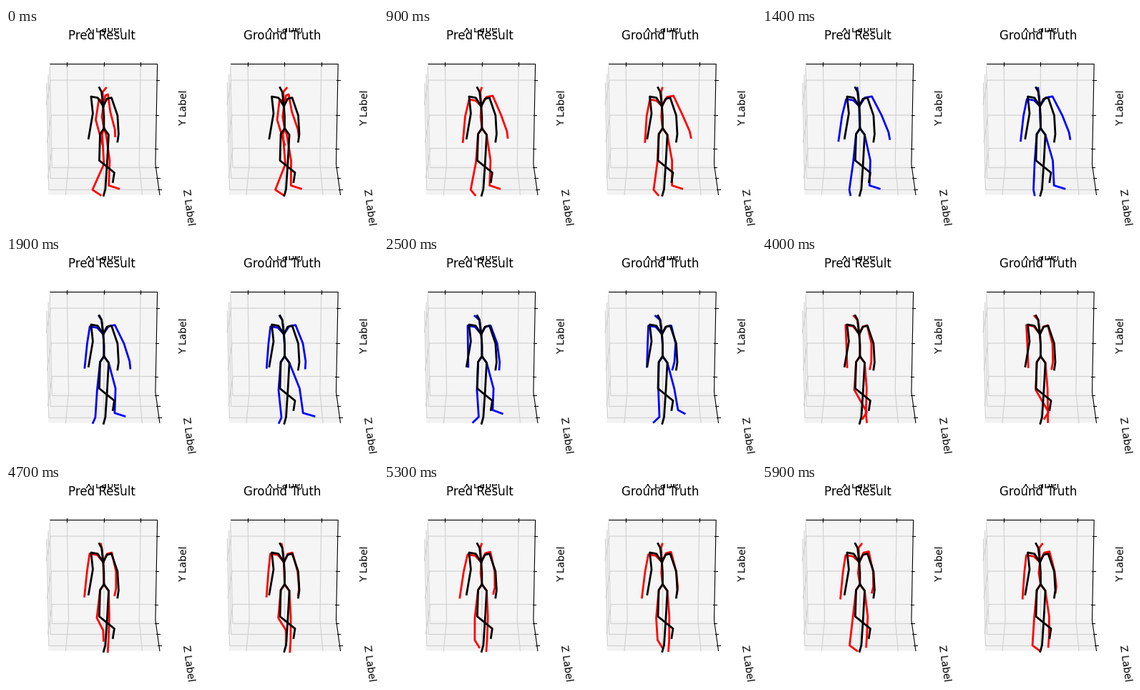
Write a matplotlib script that moves like this. It is 520 by 280 pixels and loops after 6 s.

```python
import numpy as np
import matplotlib.pyplot as plt
from matplotlib.animation import FuncAnimation

W, H, DPI = 520, 280, 100
FRAMES, INTERVAL = 60, 100
ROOT, THORAX = (137, 140), (136, 109)

fig = plt.figure(figsize=(W / DPI, H / DPI), dpi=DPI, facecolor="white")
ax = fig.add_axes([0, 0, 1, 1])
ax.set_xlim(-0.5, W - 0.5)
ax.set_ylim(H - 0.5, -0.5)
ax.axis("off")


def lerp(a, b, f):
    return tuple(p + (q - p) * f for p, q in zip(a, b))


def path(dx, *points, **style):
    x, y = np.array(points, float).T
    return ax.plot(x + dx, y, **style)[0]


def draw_box(dx):
    """Perspective box: back wall, floor and left wall with grid and ticks."""
    top_l, top_r = (62, 50), (211.7, 50)
    back_l, back_r = (65, 190), (209, 190)
    front_l, front_r = (59, 233), (215, 233)
    front_top = (56, 82)
    for corners, shade in (
        ((top_l, back_l, front_l, front_top), 0.975),
        ((back_l, back_r, front_r, front_l), 0.95),
        ((top_l, top_r, back_r, back_l), 0.9625),
    ):
        x, y = np.array(corners).T
        ax.fill(x + dx, y, color=str(shade), lw=0)

    grid = dict(color="#d0d0d0", lw=0.8, zorder=1.5)
    axis = dict(color="black", lw=0.8, zorder=1.8)
    for f in (0.157, 0.5, 0.843):
        x, y = lerp(top_l, top_r, f)
        path(dx, (x, y), lerp(back_l, back_r, f), lerp(front_l, front_r, f), **grid)
        path(dx, (x, y - 3), (x, y + 2), **axis)
    for f in (0.161, 0.511, 0.843):
        x, y = lerp(top_r, back_r, f)
        path(dx, lerp(front_top, front_l, f), lerp(top_l, back_l, f), (x, y), **grid)
        path(dx, (x - 1.5, y), (x + 3, y), **axis)
    for f in (0.116, 0.465, 0.837):
        x, y = lerp(back_r, front_r, f)
        path(dx, lerp(top_l, front_top, f), lerp(back_l, front_l, f), (x, y), **grid)
        path(dx, (x - 1.5, y), (x + 3, y), **axis)
    path(dx, top_l, top_r, back_r, front_r, **axis)


def draw_labels(dx, title):
    centre = dict(ha="center", va="baseline", rotation_mode="anchor")
    ax.text(134 + dx, 16, title, size=12, **centre)
    ax.text(137 + dx, 6, "X Label", size=10, **centre)
    ax.text(253 + dx, 111, "Y Label", size=10, rotation=89, **centre)
    ax.text(251 + dx, 251.3, "Z Label", size=10, rotation=-82, **centre)


def wave(t, peak, period):
    return np.cos(2 * np.pi * (t - peak) / period)


def bump(t, peak, width):
    return np.exp(-((t - peak) / width) ** 2)


def smoothstep(u):
    u = np.clip(u, 0, 1)
    return u * u * (3 - 2 * u)


def walk(t, drift):
    """Head, arms (shoulder, elbow, hand) and legs (knee, ankle, toe) at time t.

    drift is 0 for the predicted walk and 1 for the true one.
    """
    start = np.exp(-t / 5)             # body still turned sideways
    turn = wave(t, -2, 66)
    swing = wave(t, 33, 40)            # left arm
    reach = bump(t, 14.5, 11)          # right arm
    stride = bump(t, 37, 13)           # left leg crosses over
    lift = bump(t, 47, 6)
    sway = wave(t, 22, 52)             # right leg
    heel = smoothstep((t - 22) / 24)
    early, late = drift * bump(t, 20, 6), drift * bump(t, 31, 6)

    head = (133 + 7 * turn, 83.5)

    shoulder = (117 + 13 * start, 97.8 + 1.8 * wave(t, 6, 60))
    hand = (115 + 9 * swing + 16 * start + 2 * drift - 13 * late,
            157 + 3 * turn + 3 * start)
    elbow = ((shoulder[0] + hand[0]) / 2 - 7 * start, 122 + 6 * start)
    arm_l = shoulder, elbow, hand

    slip = 4 * drift - 12 * early - 23 * late
    arm_r = ((148 + 6 * reach + 1.5 * turn - 8 * start, 95.5 - 1.7 * turn - 1.5 * start),
             (154 + 14 * reach + 1.5 * turn - 12 * start + 0.3 * slip, 122 - 5 * start),
             (152 + 27 * reach + 2 * turn - 6 * start + slip, 155 - 4 * turn))

    ankle = (121 + 27 * stride + 3 * drift + 5 * early - 15 * late,
             226 - 3 * stride - 20 * lift)
    toe = (ankle[0] + 1 + 10.5 * turn, ankle[1] + 7.5 + 7 * lift)
    leg_l = (127 + 8 * bump(t, 32, 7) + 10 * start + drift, 187 + 3 * start), ankle, toe

    ankle = (147.8 + 4.5 * sway + 2 * drift + 9 * early,
             220 - 8 * bump(t, 30, 7) - 8 * bump(t, 61, 6))
    toe = (ankle[0] + 14 - 15 * heel + 2 * early - 14 * late,
           ankle[1] + 4.5 + 10 * heel)
    leg_r = (149 + 4.5 * sway + drift + 4 * early - 8 * late, 185), ankle, toe
    return head, arm_l, arm_r, leg_l, leg_r


def limbs(head, arm_l, arm_r, leg_l, leg_r):
    """Five polylines: torso, two arms, two legs."""
    lean = head[0] - 130.5
    spine = (137 - 0.3 * max(lean, 0), 124)
    neck = (133.7 + 0.15 * lean, 89)
    lines = [(ROOT, spine, THORAX, neck, head)]
    for (shoulder, elbow, hand), bend in ((arm_l, 0), (arm_r, 1.5)):
        collar = (THORAX[0] + 0.45 * (shoulder[0] - THORAX[0]), shoulder[1] + 1.7)
        x, y = lerp(elbow, hand, 0.72)
        lines.append((THORAX, collar, shoulder, elbow, (x + bend, y), hand))
    half = min(6, 0.22 * (arm_r[0][0] - arm_l[0][0]))
    for leg, side, drop in ((leg_l, -0.9, 8), (leg_r, 1.1, 9)):
        lines.append((ROOT, (ROOT[0] + side * half, ROOT[1] + drop), *leg))
    return lines


def bones(color, zorder):
    style = dict(color=color, lw=2, zorder=zorder, solid_joinstyle="round")
    return [ax.plot([], [], **style)[0] for _ in range(5)]


def set_bones(lines, shape, dx):
    for line, points in zip(lines, shape):
        x, y = np.array(points, float).T
        line.set_data(x + dx, y)


REST = limbs((130.5, 83),
             ((119, 95.5), (121.5, 119), (115.5, 154)),
             ((147.5, 97), (156, 122), (156, 158.5)),
             ((130.5, 185), (151.5, 202), (149.5, 215)),
             ((141.5, 187), (139, 225), (136.5, 234)))

panels = []
for dx, title, drift in ((-0.6, "Pred Result", 0), (252, "Ground Truth", 1)):
    draw_box(dx)
    draw_labels(dx, title)
    set_bones(bones("black", 4), REST, dx)
    panels.append((dx, drift, bones("red", 3)))


def update(i):
    color = "blue" if 10 <= i < 35 else "red"
    for dx, drift, lines in panels:
        set_bones(lines, limbs(*walk(i, drift)), dx)
        for line in lines:
            line.set_color(color)
    return [line for _, _, lines in panels for line in lines]


anim = FuncAnimation(fig, update, frames=FRAMES, interval=INTERVAL,
                     repeat=True, repeat_delay=0)
plt.show()
```
